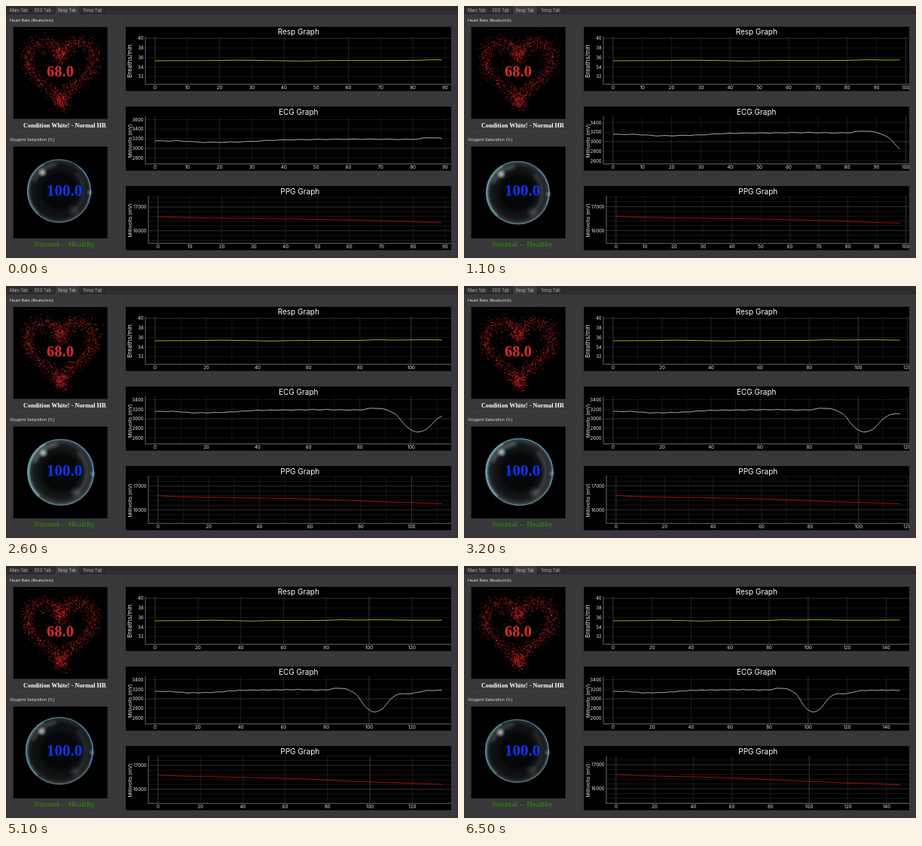
Animation, 600 px wide and 336 px high, one loop 6.6 s. Source, as an HTML page with a canvas:

```html
<!DOCTYPE html>
<html lang="en">
<head>
<meta charset="utf-8">
<title>Vital signs dashboard</title>
<style>
html, body { margin: 0; width: 100%; height: 100%; overflow: hidden; background: #38373a; }
#stage { position: relative; width: 600px; height: 336px; overflow: hidden; }
canvas, svg { position: absolute; left: 0; top: 0; display: block; }
text { font-family: Inter, "Open Sans", sans-serif; fill: #e4e4e4; }
.tab { font-size: 5.5px; fill: #b4b4b6; }
.label { font-size: 5.4px; }
.title { font-size: 10px; text-anchor: middle; fill: #fff; }
.tick { font-size: 6.1px; }
.x { text-anchor: middle; }
.y { text-anchor: end; }
.value, .status { font-family: "Liberation Serif", Tinos, serif; font-weight: bold; text-anchor: middle; }
</style>
</head>
<body>
<div id="stage">
<canvas id="art" width="600" height="336"></canvas>
<svg width="600" height="336" viewBox="0 0 600 336">
  <defs>
    <clipPath id="edge"><rect x="159" y="0" width="432" height="336"/></clipPath>
  </defs>
  <rect width="600" height="10.5" fill="#2d2c2f"/>
  <rect x="65" width="32.5" height="10.5" fill="#3b3a3d"/>
  <path d="M33.5 0V10M65 0V10M97.5 0V10M131 0V10M0 10.5H65M97.5 10.5H600" stroke="#232225" stroke-width=".7"/>
  <text class="tab" x="5" y="7.7">Main Tab</text>
  <text class="tab" x="38" y="7.7">EEG Tab</text>
  <text class="tab" x="69" y="7.7">Resp Tab</text>
  <text class="tab" x="102" y="7.7">Temp Tab</text>
  <g fill="none" stroke="#434246" stroke-width=".7">
    <rect x="5" y="24" width="144" height="144" rx="2"/>
    <rect x="5" y="183.500" width="144" height="147" rx="2"/>
    <path d="M153 14V332"/>
  </g>
  <text class="label" x="5" y="21">Heart Rate (Beats/min)</text>
  <text class="label" x="5" y="180.300">Oxygent Saturation (%)</text>
  <text class="value" x="72" y="94" font-size="20.5" style="fill:#dc2b2b">68.0</text>
  <text class="status" x="78" y="162.300" font-size="8.25" style="fill:#fff">Condition White! - Normal HR</text>
  <text class="value" x="77.500" y="253" font-size="21" style="fill:#0b35f5">100.0</text>
  <text class="status" x="77.500" y="321.200" font-size="10.35" style="fill:#2c7812">Normal -- Healthy</text>
  <g id="plots" clip-path="url(#edge)"></g>
</svg>
</div>
<script>
const STEP = 100, STEPS = 66;
const PAD = 0.034, PLOT_H = 63.6, RIGHT = 591.5;

// Smooth curve through [x, y] knots.
function curve(knots) {
  const slope = i => {
    const a = knots[Math.max(0, i - 1)], b = knots[Math.min(knots.length - 1, i + 1)];
    return (b[1] - a[1]) / (b[0] - a[0]);
  };
  return x => {
    let i = 0;
    while (i < knots.length - 2 && x > knots[i + 1][0]) i++;
    const [x0, y0] = knots[i], [x1, y1] = knots[i + 1];
    const w = x1 - x0, u = (x - x0) / w, v = 1 - u;
    return y0 * (1 + 2 * u) * v * v + y1 * u * u * (3 - 2 * u)
      + w * u * v * (slope(i) * v - slope(i + 1) * u);
  };
}

const resp = curve([[0, 35.32], [15, 35.34], [25, 35.42], [35, 35.36], [45, 35.26], [55, 35.36],
  [80, 35.4], [87, 35.52], [93, 35.46], [105, 35.52], [117, 35.44], [128, 35.42], [147, 35.48]]);
const ecgBase = curve([[0, 3153], [8, 3152], [15, 3126], [28, 3138], [38, 3171], [54, 3185], [66, 3190],
  [80, 3187], [85.5, 3224], [90, 3193], [92.5, 3140], [94.6, 3060], [96, 2975], [98, 2848], [100, 2762],
  [102, 2729], [104, 2735], [106, 2778], [109, 2940], [111.3, 3035], [113.5, 3096], [117, 3103],
  [120.5, 3115], [125, 3158], [129, 3174], [147, 3178]]);
const ecg = x => ecgBase(x) + 5 * Math.sin(x * 1.15);
const ppg = curve([[0, 16600], [5, 16572], [12, 16548], [30, 16516], [47, 16485], [60, 16455], [75, 16405],
  [89, 16340], [98, 16314], [106, 16290], [117, 16256], [134, 16205], [147, 16165]]);

const graphs = [
  { name: "Resp Graph", unit: "Breaths/min", size: 7.8, top: 28, left: 185, span: 10, minor: 2, major: 10,
    label: 2, color: "#d4dc10", data: resp, unitY: 73.5 },
  { name: "ECG Graph", unit: "Millivolts (mV)", size: 6.8, top: 134.3, left: 185, span: 1000, minor: 200, major: 1000,
    label: 200, color: "#d2d2d2", data: ecg, unitY: 180 },
  { name: "PPG Graph", unit: "Millivolts (mV)", size: 6.8, top: 240.3, left: 189, span: 2000, minor: 200, major: 1000,
    label: 1000, color: "#d01212", data: ppg, unitY: 286 }
];

const line = (x1, y1, x2, y2, color, width = 0.7) =>
  `<path d="M${x1} ${y1}L${x2} ${y2}" stroke="${color}" stroke-width="${width}"/>`;
const text = (cls, x, y, s, extra = "") => `<text class="${cls}" x="${x}" y="${y}" ${extra}>${s}</text>`;

function drawGraph(g, last) {
  const y0 = g.top + 12.7, y1 = y0 + PLOT_H, mid = (y0 + y1) / 2;
  const values = Array.from({ length: last + 1 }, (_, x) => g.data(x));
  const center = (Math.min(...values) + Math.max(...values)) / 2;
  const scale = (RIGHT - g.left) / (last * (1 + 2 * PAD));
  const px = x => g.left + (x + last * PAD) * scale;
  const py = v => mid - (v - center) * PLOT_H / g.span;
  let out = `<rect x="159" y="${g.top - 0.3}" width="432" height="85.6" fill="#000"/>`;

  const xGrid = last < 126 ? 10 : 20, xLabel = last < 107 ? 10 : 20;
  for (let x = 0; x <= last * (1 + PAD); x += 10) {
    if (x % xGrid === 0) {
      const shade = x % 100 === 0 ? "#505050" : x % 20 === 0 ? "#2a2a2a" : "#1c1c1c";
      out += line(px(x), y0, px(x), y1, shade);
    }
    if (x % xLabel === 0) out += text("tick x", px(x), y1 + 6.3, x);
  }
  const low = center - g.span / 2, high = center + g.span / 2;
  for (let v = Math.ceil(low / g.minor) * g.minor; v <= high; v += g.minor) {
    out += line(g.left, py(v), RIGHT, py(v), v % g.major === 0 ? "#464646" : "#222");
    if (v % g.label === 0) out += text("tick y", g.left - 2.3, py(v) + 2.2, v);
  }
  out += line(g.left, y0, g.left, y1, "#929292") + line(g.left, y1, RIGHT, y1, "#929292");
  const points = values.map((v, x) => px(x).toFixed(2) + "," + py(v).toFixed(2)).join(" ");
  out += `<polyline points="${points}" fill="none" stroke="${g.color}" stroke-width=".8"/>`;
  out += text("title", (g.left + RIGHT) / 2, g.top + 10.3, g.name);
  out += text("x", 0, 0, g.unit, `font-size="${g.size}" transform="translate(167.3 ${g.unitY}) rotate(-90)"`);
  return out;
}

let seed = 20;
const rand = () => (seed = (seed * 16807) % 2147483647) / 2147483647;
const TAU = Math.PI * 2;
const dots = Array.from({ length: 2500 }, () => {
  const stray = rand() < 0.14 ? 1.7 : 1;
  return {
    a: rand() * TAU,
    dx: (rand() + rand() + rand() - 1.5) * 9.5 * stray,
    dy: (rand() + rand() + rand() - 1.5) * 9.5 * stray,
    phase: rand(), cycles: 3 + Math.floor(rand() * 9),
    light: 0.3 + rand() * 0.7, size: 0.6 + rand() * 0.6
  };
});

const ctx = document.getElementById("art").getContext("2d");

function clipBox(y) {
  ctx.save();
  ctx.beginPath();
  ctx.rect(9.7, y, 125, 122.5);
  ctx.clip();
  ctx.fillStyle = "#000";
  ctx.fillRect(9, y, 127, 123);
}

function drawHeart(k) {
  clipBox(28);
  for (const d of dots) {
    const turn = TAU * (k / STEPS * d.cycles + d.phase);
    const a = d.a + 0.04 * Math.sin(turn);
    const x = 72.5 + 2.8 * 16 * Math.sin(a) ** 3 + d.dx + 1.8 * Math.cos(turn);
    const y = 82 - 2.8 * (13 * Math.cos(a) - 5 * Math.cos(2 * a) - 2 * Math.cos(3 * a) - Math.cos(4 * a))
      + d.dy + 1.8 * Math.sin(turn);
    const glow = d.light * (0.72 + 0.28 * Math.sin(turn * 2));
    ctx.fillStyle = `rgba(${190 + 55 * d.light},${30 + 25 * d.light},${32 + 25 * d.light},${glow})`;
    ctx.fillRect(x - d.size / 2, y - d.size / 2, d.size, d.size);
  }
  ctx.restore();
}

// step, centre x, centre y, radius, glow
const bubbleKeys = [
  [0, 70.5, 246.7, 42.5, 0.35], [11, 71.5, 249, 42.3, 0.65], [20, 72, 248.6, 43.7, 0.9], [32, 73.5, 248, 45, 0.8],
  [41, 72.2, 248, 45, 0.5], [51, 71, 246.5, 45, 0.35], [65, 70.5, 246.7, 42.5, 0.35], [66, 70.5, 246.7, 42.5, 0.35]
];

function spot(x, y, r, color, alpha) {
  const g = ctx.createRadialGradient(x, y, 0, x, y, r);
  g.addColorStop(0, `rgba(${color},${alpha})`);
  g.addColorStop(1, `rgba(${color},0)`);
  ctx.fillStyle = g;
  ctx.fillRect(x - r, y - r, 2 * r, 2 * r);
}

function arc(x, y, r, from, to, width, color, blur) {
  ctx.filter = `blur(${blur}px)`;
  ctx.strokeStyle = color;
  ctx.lineWidth = width;
  ctx.beginPath();
  ctx.arc(x, y, r, from, to);
  ctx.stroke();
  ctx.filter = "none";
}

function drawBubble(k) {
  let i = 0;
  while (k > bubbleKeys[i + 1][0]) i++;
  const from = bubbleKeys[i], to = bubbleKeys[i + 1], u = (k - from[0]) / (to[0] - from[0]);
  const [, x, y, r, glow] = from.map((v, n) => v + (to[n] - v) * u);
  clipBox(187.2);
  const body = ctx.createRadialGradient(x, y, r * 0.5, x, y, r);
  body.addColorStop(0, "rgba(12,16,18,.4)");
  body.addColorStop(0.6, `rgba(70,80,84,${0.15 + 0.2 * glow})`);
  body.addColorStop(0.92, `rgba(110,130,138,${0.2 + 0.35 * glow})`);
  body.addColorStop(1, `rgba(100,150,160,${0.35 + 0.4 * glow})`);
  ctx.fillStyle = body;
  ctx.beginPath();
  ctx.arc(x, y, r, 0, TAU);
  ctx.fill();
  arc(x, y, r - 0.6, 0, TAU, 1.3, `rgba(88,138,150,${0.65 + 0.3 * glow})`, 0.4);
  arc(x, y, r - 2.2, 0.2, 2.2, 1.2, "rgba(120,92,62,.5)", 0.7);
  arc(x, y, r - 1.5, 2.3, 4.2, 2, `rgba(150,220,235,${0.25 + 0.65 * glow})`, 0.9);
  arc(x, y, r - 1.2, -0.9, 0.4, 1.5, `rgba(80,130,200,${0.35 + 0.4 * glow})`, 0.7);
  arc(x - 2, y, r - 8, -0.8, 0.9, 4, `rgba(150,155,160,${0.12 + 0.35 * glow})`, 2);
  arc(x, y, r - 7, 3.5, 4.6, 4, `rgba(185,200,205,${0.2 + 0.3 * glow})`, 2);
  spot(x - r * 0.52, y - r * 0.58, 6.5, "235,245,245", 0.75);
  spot(x + r * 0.45, y + r * 0.62, 9, "150,165,170", 0.15 + 0.2 * glow);
  spot(x + r * 0.96, y + 2, 5, "190,215,220", 0.4);
  ctx.restore();
}

const plots = document.getElementById("plots");
let shown = -1;

function play() {
  const k = Math.floor(performance.now() / STEP) % STEPS;
  if (k !== shown) {
    shown = k;
    const last = Math.floor(89 + k * 58 / 65 + 1e-6);
    plots.innerHTML = graphs.map(g => drawGraph(g, last)).join("");
    ctx.clearRect(0, 0, 600, 336);
    drawHeart(k);
    drawBubble(k);
  }
  requestAnimationFrame(play);
}
play();
</script>
</body>
</html>
```
